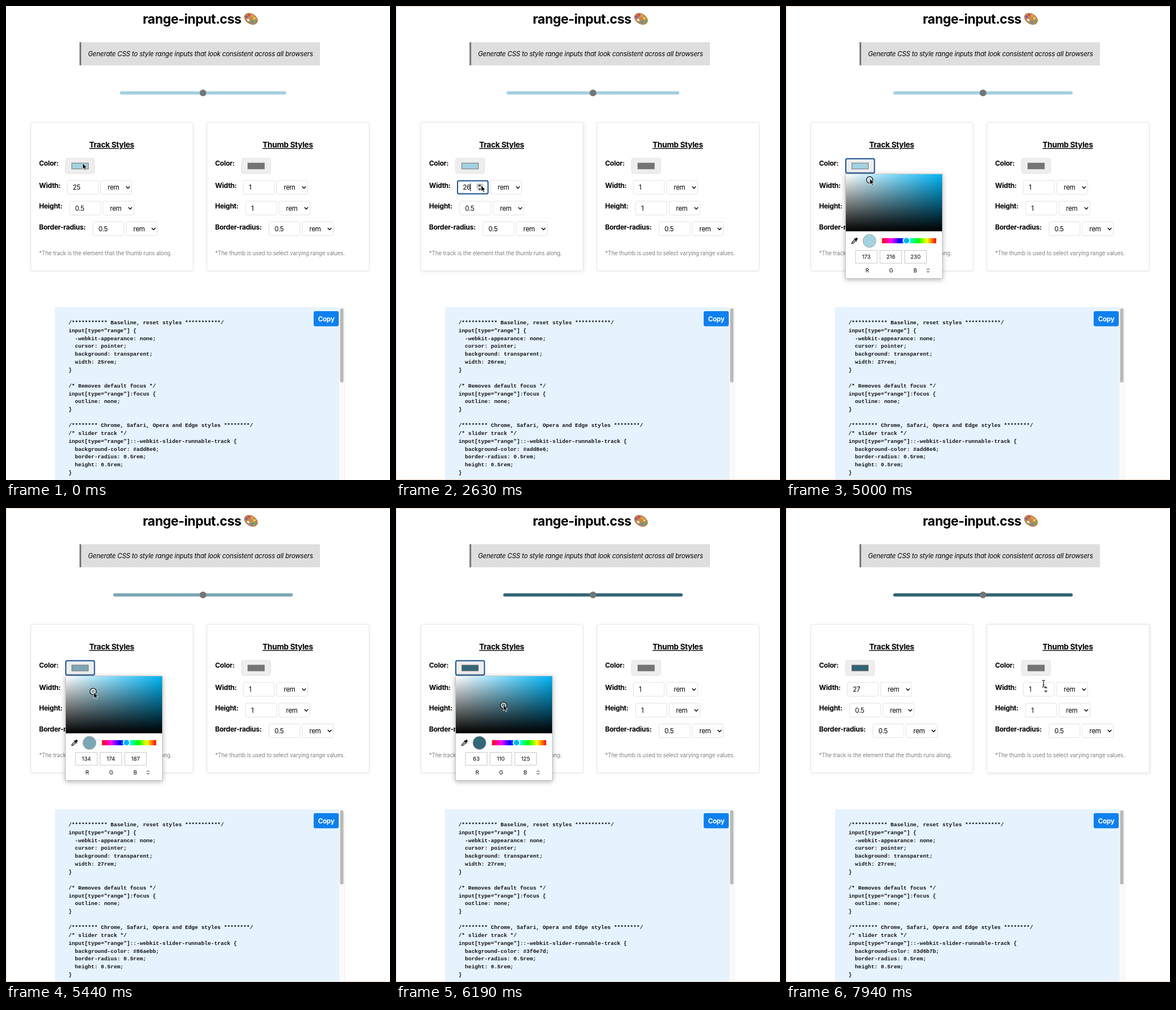
Animation, 674 px wide and 831 px high, one loop 8 s. Source, as an HTML page:

```html
<!DOCTYPE html>
<html lang="en">
<head>
<meta charset="utf-8">
<title>range-input.css</title>
<style>
html, body { margin: 0; width: 100%; height: 100%; overflow: hidden; background: #fff; }
svg { display: block; width: 674px; height: 831px; }
text { font: 11.5px Inter, "Open Sans", sans-serif; font-optical-sizing: none; letter-spacing: -.022em; white-space: pre; }
.title { font-size: 23px; font-weight: 700; }
.intro { font-style: italic; letter-spacing: -.018em; }
.head { font-size: 13.6px; font-weight: 700; text-anchor: middle; text-decoration: underline; text-decoration-thickness: 1px; }
.label { font-size: 12px; font-weight: 700; }
.note { font-size: 9.7px; letter-spacing: -.01em; fill: #808080; }
.copy { font-size: 11.6px; font-weight: 700; fill: #fff; text-anchor: middle; }
.code { font: 700 9.47px "Liberation Mono", "Courier New", monospace; letter-spacing: 0; fill: #111; }
.rgb { font-size: 9.6px; letter-spacing: 0; text-anchor: middle; }
.field { fill: #fff; stroke: #e2e2e2; }
.focus { fill: none; stroke: #1d5493; stroke-width: 2; }
.line { fill: none; stroke: #111; stroke-width: 1.5; stroke-linecap: round; stroke-linejoin: round; }
.card { filter: drop-shadow(0 1px 2px rgba(0,0,0,.04)); }
.card.hover { filter: drop-shadow(1px 1px 3px rgba(0,0,0,.09)); }
</style>
</head>
<body>
<svg id="stage" viewBox="0 0 674 831" xmlns="http://www.w3.org/2000/svg">
  <defs>
    <linearGradient id="sat"><stop stop-color="#fff"/><stop offset="1" stop-color="#00b4f5"/></linearGradient>
    <linearGradient id="val" x2="0" y2="1"><stop stop-opacity="0"/><stop offset="1"/></linearGradient>
    <linearGradient id="hue">
      <stop stop-color="#f00"/><stop offset=".167" stop-color="#f0f"/><stop offset=".333" stop-color="#00f"/>
      <stop offset=".5" stop-color="#0ff"/><stop offset=".667" stop-color="#0f0"/>
      <stop offset=".833" stop-color="#ff0"/><stop offset="1" stop-color="#f00"/>
    </linearGradient>
  </defs>
</svg>
<script>
const stage = document.getElementById('stage');
let parent = stage;

function add(tag, attrs, content) {
  const node = document.createElementNS('http://www.w3.org/2000/svg', tag);
  for (const key in attrs) node.setAttribute(key, attrs[key]);
  if (content !== undefined) node.textContent = content;
  return parent.appendChild(node);
}
const rect = (x, y, width, height, attrs) => add('rect', { x, y, width, height, ...attrs });
const text = (x, y, cls, content) => add('text', { x, y, class: cls }, content);
const circle = (cx, cy, r, attrs) => add('circle', { cx, cy, r, ...attrs });
const path = (d, attrs) => add('path', { d, ...attrs });
function group(build, attrs = {}) {
  const outer = parent;
  const node = parent = add('g', attrs);
  build();
  parent = outer;
  return node;
}
const show = (node, on) => node.setAttribute('visibility', on ? 'visible' : 'hidden');

// Header
text(240, 30.5, 'title', 'range-input.css');
group(() => {
  add('ellipse', { rx: 12.4, ry: 8.6, fill: '#c08a52', stroke: '#94633a', 'stroke-width': .8 });
  add('ellipse', { cx: -3, cy: 4.2, rx: 2.4, ry: 1.7, fill: '#fff' });
  [[-8.5, 1, '#8c4fb0'], [-6.5, -3.5, '#e0453c'], [-1, -5.2, '#f2a83b'], [4.5, -4, '#f4d44b'], [8.3, 0, '#5cb052'], [4.5, 4, '#3f93d8']]
    .forEach(([x, y, fill]) => circle(x, y, 2.1, { fill }));
}, { transform: 'translate(430 22.5) rotate(32)' });
rect(129, 63.5, 422, 40.5, { fill: '#dedede' });
rect(129, 63.5, 3, 40.5, { fill: '#777' });
text(144, 88, 'intro', 'Generate CSS to style range inputs that look consistent across all browsers');

// Preview slider
const REM = 11.67, CENTER = 345.75;
const slider = rect(0, 149.4, 0, REM / 2, { rx: REM / 4 });
circle(CENTER, 152.4, REM / 2, { fill: '#757575' });

// Cards
function spinner(x, y) {
  let pressed;
  const node = group(() => {
    pressed = group(() => {
      rect(x - 5.5, y - 6.5, 11, 13, { fill: '#e4e4e4' });
      rect(x - 5.5, y - 6.5, 11, 6.5, { fill: '#c4c4c4' });
    });
    path(`M${x - 3} ${y - 2}l3-3.4 3 3.4zM${x - 3} ${y + 2}l3 3.4 3-3.4z`, { fill: '#444' });
  });
  show(pressed, false);
  return { node, pressed };
}

function card(left, title, values, note) {
  const box = rect(left + .5, 204, 285, 260.5, { rx: 3, fill: '#fff', stroke: '#e3e3e3', class: 'card' });
  const at = dx => left + dx;
  text(at(142.5), 248, 'head', title);
  text(at(15), 280, 'label', 'Color:');
  rect(at(61.5), 267, 51, 26.5, { rx: 3, fill: '#eee', stroke: '#e2e2e2' });
  const swatch = rect(at(72.5), 275.3, 29, 10.4, { fill: '#757575', stroke: '#757575' });
  const fields = [['Width:', 64.5, 305.8], ['Height:', 68.5, 342.2], ['Border-radius:', 109.5, 378.4]].map(([name, dx, y], i) => {
    text(at(15), y + 13.2, 'label', name);
    rect(at(dx), y, 54.5, 24.2, { rx: 3, class: 'field' });
    rect(at(dx + 58.5), y, 54.5, 24.2, { rx: 3, class: 'field' });
    text(at(dx + 71), y + 16.4, '', 'rem');
    path(`M${at(dx + 103.7)} ${y + 11}l2.8 3 2.8-3`, { class: 'line' });
    return text(at(dx + 9.7), y + 16.4, '', values[i]);
  });
  text(at(15), 437, 'note', note);
  return { box, swatch, width: fields[0], spin: spinner(at(104), 318) };
}
const track = card(43, 'Track Styles', ['25', '0.5', '0.5'], '*The track is the element that the thumb runs along.');
const thumb = card(352, 'Thumb Styles', ['1', '1', '0.5'], '*The thumb is used to select varying range values.');
const widthFocus = rect(108, 306.5, 53.5, 22.8, { rx: 2.5, class: 'focus' });
const caret = rect(130.3, 311, 1, 13.5, { fill: '#000' });
const colorFocus = rect(105, 267.8, 50.3, 25, { rx: 2.5, class: 'focus' });

// Generated code
rect(86, 528, 498, 303, { fill: '#e6f3ff' });
rect(584, 528, 11, 303, { fill: '#fafafa' });
rect(584, 528, .8, 303, { fill: '#ececec' });
rect(594.3, 528, .7, 303, { fill: '#ececec' });
rect(586.4, 530, 6, 130, { rx: 3, fill: '#b9b9b9' });
const source = `/*********** Baseline, reset styles ***********/
input[type="range"] {
  -webkit-appearance: none;
  cursor: pointer;
  background: transparent;
  width: 25rem;
}

/* Removes default focus */
input[type="range"]:focus {
  outline: none;
}

/******** Chrome, Safari, Opera and Edge styles ********/
/* slider track */
input[type="range"]::-webkit-slider-runnable-track {
  background-color: #add8e6;
  border-radius: 0.5rem;
  height: 0.5rem;
}`;
const lines = source.split('\n').map((line, i) => text(109.7, 557.8 + i * 13.86, 'code', line));
const widthLine = lines[5], colorLine = lines[16];
rect(540, 535, 44, 26.5, { rx: 3, fill: '#0f80f0' });
text(562, 552.6, 'copy', 'Copy');

// Colour picker
let pickerSwatch, ring, channels;
const picker = group(() => {
  rect(104.5, 294.5, 170, 183, { fill: '#fff', stroke: '#c4c4c4', style: 'filter:drop-shadow(0 2px 4px rgba(0,0,0,.3))' });
  rect(105, 295, 169, 100, { fill: 'url(#sat)' });
  rect(105, 295, 169, 100, { fill: 'url(#val)' });
  ring = group(() => {
    circle(0, 0, 5.2, { fill: 'none', stroke: '#111', 'stroke-width': 2 });
    circle(0, 0, 4, { fill: 'none', stroke: '#fff', 'stroke-width': 1.6 });
  });
  path('M115.5 416.5l.6-2.4 5-5 1.8 1.8-5 5z', { fill: '#fff', stroke: '#111', 'stroke-width': 1.2 });
  path('M120 408l4 4M122.3 409.7l1.6-1.6', { class: 'line' });
  circle(123.6, 408.4, 2.1, { fill: '#111' });
  pickerSwatch = circle(146.5, 411.8, 11.5, { stroke: '#9a9a9a', 'stroke-width': .7 });
  rect(168.5, 407, 95, 9, { fill: 'url(#hue)' });
  circle(211.5, 411.4, 5.6, { fill: '#00b4f5', stroke: '#fff', 'stroke-width': 1.6 });
  channels = [141, 184, 227.4].map((x, i) => {
    rect(x - 19, 428.5, 38, 22.5, { fill: '#fff', stroke: '#c8c8c8' });
    text(x + (1.5 - i), 466.6, 'rgb', 'RGB'[i]);
    return text(x, 443.4, 'rgb', '');
  });
  path('M247.4 462.3l2-2 2 2M247.4 465l2 2 2-2', { class: 'line', style: 'stroke-width:1' });
});

// Pointer
const arrow = path('M0 0V10.6L2.5 8.4 4.2 12.2 6 11.4 4.3 7.7H7.6Z', { fill: '#000', stroke: '#fff', 'stroke-width': .8 });
const beam = path('M-2.4-6Q0-6 0-4.6 0-6 2.4-6M0-4.6V4.6M-2.4 6Q0 6 0 4.6 0 6 2.4 6M-1.2 2H1.2', { class: 'line', style: 'stroke-width:1.1' });
const frameLine = path('M674 .5H.5V830.5H674', { fill: 'none', stroke: '#f5d2c0' });

const pointerKeys = [
  [0, 134.5, 275.5], [300, 134.5, 275.5], [1500, 149.5, 314.5], [3400, 149.5, 314.5],
  [4080, 135, 280], [4450, 135, 280], [4950, 147, 301.5], [5080, 147.5, 304.5],
  [5440, 154, 323], [6190, 188.5, 345], [6420, 189.5, 346.5], [7000, 192, 347],
  [7420, 222, 342], [7940, 452, 308], [8000, 452, 308]
];
const colorKeys = [[0, 173, 216, 230], [5080, 173, 216, 230], [5440, 134, 174, 187], [6190, 63, 110, 125], [6420, 61, 107, 123], [8000, 61, 107, 123]];
const FIRST_STEP = 2380, SECOND_STEP = 3200, OPEN = 4380, CLOSE = 6950;

function sample(keys, t) {
  const i = Math.max(1, keys.findIndex(key => key[0] >= t));
  const a = keys[i - 1], b = keys[i];
  const u = (t - a[0]) / (b[0] - a[0]);
  const eased = u * u * (3 - 2 * u);
  return a.slice(1).map((v, k) => v + (b[k + 1] - v) * eased);
}
const within = (x, y, left, top, width, height) => x >= left && x <= left + width && y >= top && y <= top + height;
const move = (node, x, y) => node.setAttribute('transform', `translate(${x} ${y})`);

function render(t) {
  const [x, y] = sample(pointerKeys, t);
  const rgb = sample(colorKeys, t).map(Math.round);
  const hex = '#' + rgb.map(v => v.toString(16).padStart(2, '0')).join('');
  // The screen shows the chosen colour a little deeper than its code.
  const [r, g, b] = rgb;
  const shown = `rgb(${r - 11},${g - 7},${b - 6})`;
  const width = t < FIRST_STEP ? 25 : t < SECOND_STEP ? 26 : 27;
  const open = t >= OPEN && t < CLOSE;
  const typing = t >= FIRST_STEP && t < OPEN;

  slider.setAttribute('x', CENTER - width * REM / 2);
  slider.setAttribute('width', width * REM);
  for (const node of [slider, track.swatch, pickerSwatch]) node.setAttribute('fill', shown);
  track.width.textContent = width;
  widthLine.textContent = `  width: ${width}rem;`;
  colorLine.textContent = `  background-color: ${hex};`;

  move(ring, 105 + 169 * (1 - r / b), 295 + 100 * (1 - b / 255));
  channels.forEach((node, i) => node.textContent = rgb[i]);

  const overTrack = !open && within(x, y, 107.5, 305.8, 54.5, 24.2);
  const overThumb = within(x, y, 416.5, 305.8, 54.5, 24.2);
  track.box.classList.toggle('hover', t >= 60 && !open && x < 329);
  thumb.box.classList.toggle('hover', x > 352);
  show(picker, open);
  show(colorFocus, open);
  show(widthFocus, typing);
  show(caret, typing && (t - (t < SECOND_STEP ? FIRST_STEP : SECOND_STEP)) % 1000 < 500);
  track.spin.node.style.display = typing || overTrack ? '' : 'none';
  thumb.spin.node.style.display = overThumb ? '' : 'none';
  show(track.spin.pressed, overTrack && x > 141);
  show(frameLine, t >= 60);

  const useBeam = overThumb && x < 453 || overTrack && x < 141;
  show(arrow, !useBeam);
  show(beam, useBeam);
  move(arrow, x, y);
  move(beam, x, y);
}

const start = performance.now();
function tick() {
  render((performance.now() - start) % 8000);
  requestAnimationFrame(tick);
}
tick();
</script>
</body>
</html>
```
